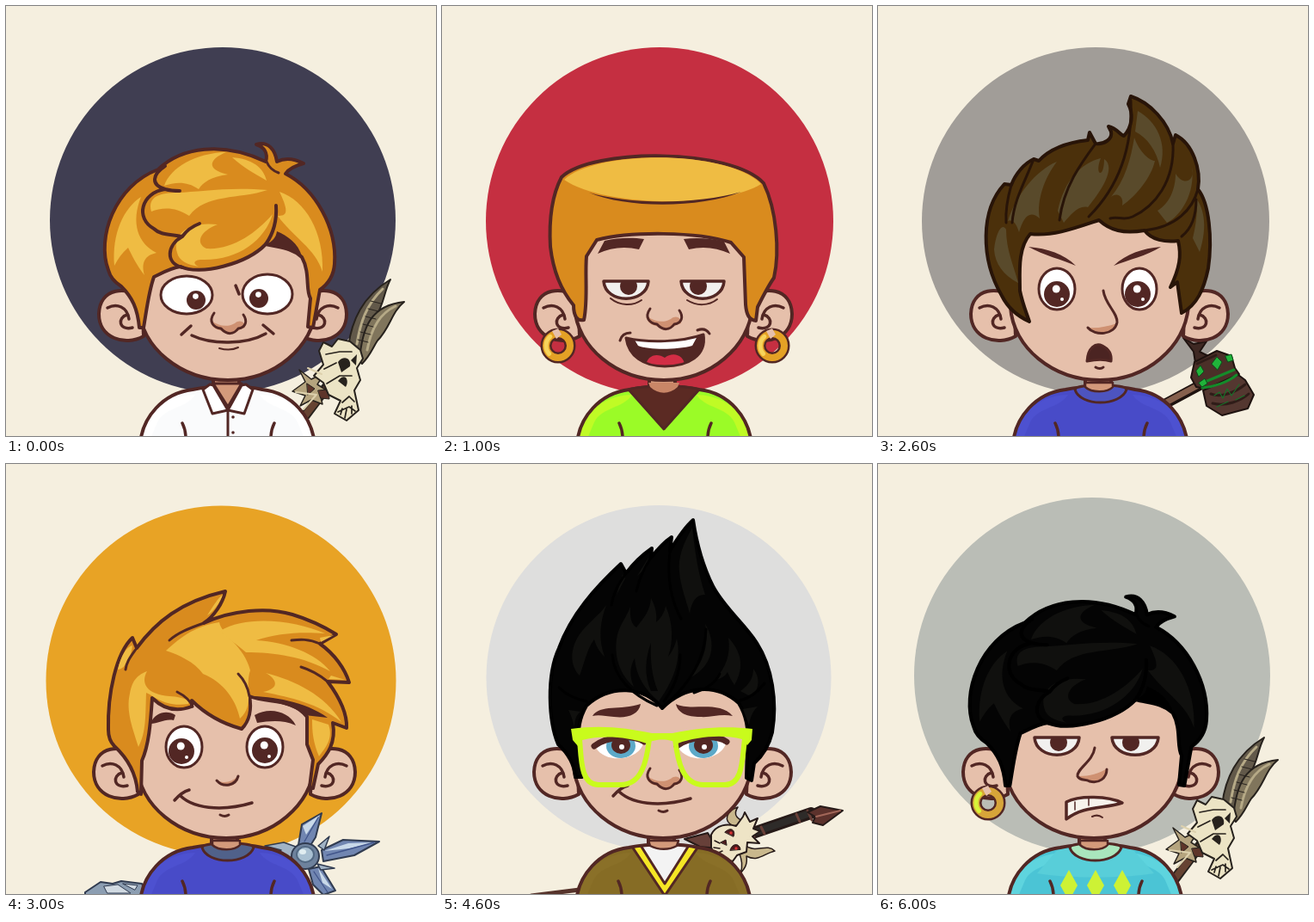
An HTML page with a canvas that plays this animation: 500 by 500 pixels, repeating every 7 s.

```html
<!DOCTYPE html>
<html lang="en">
<head>
<meta charset="utf-8">
<title>Avatars</title>
<style>
html, body { margin: 0; width: 100%; height: 100%; overflow: hidden; background: #f5efdf; }
canvas { display: block; width: 100vw; height: 100vh; }
</style>
</head>
<body>
<canvas id="stage" width="500" height="500"></canvas>
<script>
const ctx = document.getElementById('stage').getContext('2d');
const LINE = '#522724', SKIN = '#e6c0ab', SHADE = '#cf9172', WHITE = '#fff';
const GOLD = { base: '#d98b1e', light: '#efbc43', line: LINE };
const BLACK = { base: '#040404', light: '#10100e', line: '#000' };

function shape(d, fill, stroke, width = 4) {
  const p = new Path2D(d);
  if (fill) { ctx.fillStyle = fill; ctx.fill(p); }
  if (stroke) { ctx.strokeStyle = stroke; ctx.lineWidth = width; ctx.stroke(p); }
}
const line = (d, width = 3, color = LINE) => shape(d, null, color, width);

function oval(x, y, rx, ry, fill, stroke, width = 3) {
  ctx.beginPath();
  ctx.ellipse(x, y, rx, ry, 0, 0, Math.PI * 2);
  if (fill) { ctx.fillStyle = fill; ctx.fill(); }
  if (stroke) { ctx.strokeStyle = stroke; ctx.lineWidth = width; ctx.stroke(); }
}

function at(dx, dy, draw, sx = 1, sy = 1) {
  ctx.save();
  ctx.translate(dx, dy);
  ctx.scale(sx, sy);
  draw();
  ctx.restore();
}

function clipped(d, draw) {
  ctx.save();
  ctx.clip(new Path2D(d));
  draw();
  ctx.restore();
}

// Head, ears, body

function ear() {
  shape('M158 340C142 325 109 327 108 358C108 386 138 396 160 384Z', SKIN, LINE);
  line('M118 351C129 345 141 350 143 364M141 359C129 362 131 378 147 374', 3.5);
}

function head(dx, left, right) {
  at(left, 0, ear);
  at(515 + right, 0, ear, -1);
  at(dx, 0, () => {
    shape('M241 422V447C250 454 264 454 271 447V422Z', '#d49a7b', LINE);
    shape('M154 245V350C157 397 203 435 258 435C313 435 356 397 361 350V245Z', SKIN);
    line('M154 350C157 397 203 435 258 435C313 435 356 397 361 350', 4);
  });
}

const TORSO = 'M156 510C158 478 183 450 217 446C240 441 278 441 298 446C333 450 356 478 359 510Z';
const ARMS = 'M209 502C209 493 207 489 205 485M308 502C308 493 310 489 312 485';

function torso(dx, fill, light, details) {
  at(dx, 0, () => {
    shape(TORSO, fill);
    clipped(TORSO, () => {
      shape('M156 500C164 464 200 452 220 452C210 468 185 466 176 484L165 510ZM359 500C351 464 315 452 295 452C305 468 330 466 339 484L350 510Z', light);
      details();
    });
    shape(TORSO, null, LINE);
    line(ARMS, 3.5);
  });
}

function crewNeck(collar) {
  shape('M228 446C234 466 281 466 288 446C286 439 230 439 228 446Z', collar, LINE, 3);
  shape('M240 443C247 450 266 450 272 443V438H240Z', '#d49a7b', LINE, 2.5);
}

const sweater = (dx, collar) => {
  torso(dx, '#484bc8', '#4d51d0', () => {});
  at(dx, 0, () => crewNeck(collar));
};

function shirt() {
  torso(0, '#fafbfc', '#fff', () => line('M258 472V502', 3));
  [478, 496].forEach(y => oval(264, y, 1.8, 1.8, LINE));
  shape('M241 441L258 470L240 474L229 446L237 440ZM274 441L258 470L277 474L287 446L279 440Z', WHITE, LINE, 3);
  shape('M241 439L258 466L274 439Z', '#d49a7b', LINE, 3);
}

function limeShirt() {
  torso(1, '#9bfb27', '#c0fb25', () => {});
  shape('M217 446L258 492L299 446C284 441 232 441 217 446Z', '#5b2a23', LINE, 3);
  shape('M240 438L242 443C252 452 264 452 274 443L276 438Z', '#c98667');
}

function vest() {
  torso(0, '#866c25', '#8a7028', () => {
    shape('M219 442L259 502L300 442Z', '#f5e625', LINE, 3);
    shape('M230 442L259 488L288 442Z', '#f3f3f3', LINE, 3);
  });
  shape('M240 438L242 444C252 449 264 449 273 444L275 438Z', '#d49a7b', LINE, 2.5);
}

function argyle() {
  torso(-5, '#4bc4d5', '#5ed4de', () => {
    shape('M190 476C225 482 290 482 326 476L300 447H215Z', '#58ced9');
    [227, 258, 289].forEach(x => shape(`M${x} 472L${x + 10} 490L${x} 508L${x - 10} 490Z`, '#cdf235'));
  });
  at(-5, 0, () => crewNeck('#a9e6bd'));
}

// Hair

function sweptHair(c) {
  shape('M119 307C105 270 126 209 177 190C204 164 252 157 302 181C305 171 300 164 291 161C305 157 313 167 315 181C325 176 336 178 346 183C335 186 329 189 325 195C360 213 385 258 382 300C381 314 375 323 365 330L357 374L351 373L354 340C348 330 354 310 344 292C332 281 318 281 302 277C280 300 225 314 203 303C193 304 184 309 172 315C166 332 164 350 160 374L155 374C153 352 147 339 134 326C126 321 121 315 119 307Z', c.base, c.line);
  shape('M302 277C310 274 314 269 315 262C327 267 340 276 344 291C330 282 316 281 302 277Z', c.line);
  shape('M184 209C191 188 220 171 256 170C236 178 232 190 258 196C239 198 229 205 224 213C210 203 196 205 184 209Z', c.light);
  shape('M263 176C286 178 299 187 303 203C288 194 276 188 263 176ZM169 239C164 221 180 217 200 217C224 216 260 210 304 214C271 225 232 218 213 244C197 233 181 234 169 239Z', c.light);
  shape('M199 287C193 266 211 250 246 254C225 262 220 276 233 282C263 284 291 264 310 242C301 273 268 297 226 295C216 296 219 301 224 303C211 301 201 296 199 287Z', c.light);
  shape('M126 302C123 264 137 235 157 222C145 252 153 276 175 287C161 290 157 299 161 313C151 300 146 289 142 281C135 287 130 294 126 302ZM318 216C348 226 370 263 368 309C360 282 333 268 316 244C326 244 330 241 318 216Z', c.light);
  line('M185 186C170 196 168 208 185 213C157 217 150 247 172 259C180 267 192 265 205 268C187 278 185 299 205 304M185 213C192 215 197 215 202 215M205 268C210 261 217 256 225 253M314 232C315 248 312 263 302 277', 4, c.line);
  line('M303 181C306 188 311 192 317 194', 3, c.line);
}

function flatTop() {
  shape('M139 199C174 165 337 165 374 206C389 237 393 285 386 316C379 326 373 338 367 350L365 366C357 365 354 359 353 347L351 292L336 275C296 262 219 262 180 272L168 291C166 313 170 342 165 365C157 367 153 360 153 348C138 330 129 306 126 280C124 245 129 218 139 199Z', GOLD.base, LINE);
  shape('M142 202C178 168 330 166 371 207C326 235 188 234 142 202Z', GOLD.light);
  shape('M171 217C218 231 296 231 348 216C301 235 216 236 171 217Z', LINE);
  shape('M181 288L189 273C205 269 222 269 235 271L229 283C212 279 196 281 181 288ZM335 288L328 274C312 270 296 269 281 271L287 283C304 279 319 281 335 288Z', LINE);
}

function quiff() {
  const base = '#4b300b', light = '#594a2b', edge = '#281408';
  shape('M144 337C119 294 119 237 147 207L155 208C160 195 170 183 181 178L187 180C198 168 217 159 244 156L246 147L253 160C263 161 273 155 271 146L268 140C278 142 281 150 286 151C296 140 297 125 291 114L294 105C316 112 338 135 343 160L346 150C366 160 376 190 372 213C385 229 389 270 384 305C379 329 371 348 353 357L348 321L340 327C351 304 353 290 349 273C334 275 318 272 310 261C285 265 270 261 257 249C230 258 204 268 177 265C162 282 165 311 165 331C168 346 172 355 176 367C161 360 151 351 144 337Z', base, edge);
  const locks = 'M151 250C161 219 184 191 208 181C194 199 184 226 188 247C176 236 169 246 164 263C161 253 157 248 151 250ZM209 238C217 202 236 183 259 177C251 197 263 202 263 178C278 188 258 217 244 234C233 231 224 243 216 252ZM271 222C287 203 294 178 298 153C304 170 316 180 322 180C318 199 300 221 284 232C286 222 279 216 271 222ZM302 122C324 134 337 160 328 188C324 168 313 153 299 146ZM325 238C340 229 346 211 346 195C355 210 369 204 365 188C369 218 352 244 336 252ZM366 270C371 250 371 236 371 225C382 242 381 264 374 286ZM135 283C137 264 144 251 149 260C149 284 158 302 163 322C146 313 136 300 135 283Z';
  shape(locks, light);
  line('M181 178C172 202 158 225 156 252M253 160C236 183 216 210 211 249M294 110C296 160 282 208 245 245M343 160C345 204 322 233 296 245C286 250 278 244 270 247M372 213C366 236 347 257 310 261M155 208C151 222 148 237 149 252M353 268C367 257 370 239 370 225', 3, edge);
}

function windswept() {
  shape('M119 309C118 267 128 220 147 202L152 214C174 184 203 160 255 148C252 162 242 177 230 185C262 170 303 166 333 175C353 181 371 190 384 198L365 209C382 221 394 238 399 254L374 253C386 269 397 288 396 307L380 301C384 324 374 338 363 349L357 377L353 376L357 344L350 326V294C332 271 305 279 283 270C286 285 283 299 274 308C252 302 231 290 216 275L216 282C195 290 180 282 170 272C168 303 166 327 158 345L157 384L153 381C151 358 139 340 126 328C121 323 119 317 119 309Z', GOLD.base, LINE);
  shape('M347 292C337 282 315 277 283 270C309 270 348 276 374 295Z', LINE);
  shape('M186 217C211 194 226 188 248 184C251 200 277 211 284 240C277 260 290 280 272 296C268 276 254 254 229 244C219 230 201 222 186 217Z', GOLD.light);
  shape('M249 194C280 175 337 182 371 197C339 195 316 197 291 205C326 207 360 220 377 241C346 224 313 219 279 219C268 209 257 203 249 194ZM144 267C147 250 154 245 164 241C156 255 164 268 190 270C209 271 214 276 212 279C184 283 173 270 163 266C162 294 163 312 154 329C148 309 139 288 144 267Z', GOLD.light);
  shape('M241 165C246 158 248 155 252 152C249 161 242 171 234 176ZM365 202L381 199L366 207ZM378 246L394 251L375 250ZM302 243C337 252 371 269 390 300C362 278 333 272 299 265C319 261 315 250 302 243ZM356 297L375 303C381 320 371 330 364 340C357 323 356 312 356 297ZM130 239C134 222 140 213 147 211C145 228 137 239 130 239Z', GOLD.light);
  line('M152 214C145 224 140 230 139 239M230 185C213 191 200 196 190 205M365 209C352 203 341 204 332 205M374 253C363 244 353 239 343 236M283 270C281 258 276 250 270 244M217 282C214 275 207 269 199 265', 3);
}

function spikes(c) {
  shape('M155 364C154 350 146 336 135 326C124 300 121 246 136 214C150 175 178 144 208 116L214 127C223 115 234 105 244 98L243 109C250 100 258 91 267 85L265 101C274 86 283 73 292 65C296 92 303 118 315 142C328 167 352 186 366 208C384 236 390 276 384 312C380 329 371 341 363 348L360 368L354 365L355 327C357 308 353 291 345 278C318 254 282 258 256 284C234 258 196 256 168 281C160 295 157 310 160 326L163 364Z', c.base, c.line);
  shape('M160 246C148 234 149 214 160 198C170 184 183 176 191 164C183 186 182 204 189 224C182 217 179 211 177 204C169 214 166 230 160 246ZM252 276C236 262 226 248 224 226C218 236 218 247 223 259C208 246 200 226 203 204C205 188 214 180 219 166C218 180 221 187 226 190C234 180 242 171 243 156C249 167 250 176 249 184C255 179 259 172 260 165C269 186 269 206 263 224C268 218 271 211 273 203C279 228 268 254 252 276Z', c.light);
  shape('M291 74C281 92 274 108 276 126C278 145 284 158 288 174C290 160 296 151 306 152C298 128 294 101 291 74ZM286 250C303 233 311 212 306 186C319 207 317 235 286 250ZM317 251C330 237 336 222 333 202C347 217 353 235 340 257C336 251 334 247 332 242C329 247 324 250 317 251ZM347 264C357 257 362 249 362 238C371 250 368 262 360 271Z', c.light);
  shape('M147 286L161 288C156 292 154 298 154 306C152 298 150 292 147 286ZM350 285L367 282C361 288 358 295 357 304ZM210 128L213 133L203 152ZM240 109L238 120L227 130Z', c.light);
  shape('M243 264C235 246 236 227 243 208C242 229 244 247 251 264Z', c.base);
  line('M214 127C205 140 199 150 197 164M243 109C234 122 229 135 226 148M265 101C261 135 267 160 278 180M136 260C144 268 154 273 168 276M375 255C366 267 356 273 344 276M198 222C200 248 220 268 250 281M307 192C306 228 288 256 259 281M277 222C277 242 270 260 258 276M323 244C318 255 306 262 293 266', 3, c.line);
}

// Facial features

function dotEye(x, y, rx, ry, px, py, r, iris) {
  oval(x, y, rx, ry, WHITE, LINE, 3);
  oval(px, py, r, r, iris || '#522724');
  if (iris) oval(px, py, r * 0.62, r * 0.62, '#3a2122');
  oval(px - r * 0.05, py - r * 0.4, r * 0.3, r * 0.3, WHITE);
}

function lidEye(x, y, w, px) {
  const d = `M${x - w} ${y}C${x - w + 2} ${y + 27} ${x + w - 2} ${y + 27} ${x + w} ${y}Z`;
  shape(d, '#f1f0ee');
  clipped(d, () => oval(px, y + 6, 10, 10, LINE));
  shape(d, null, LINE, 3.5);
}

function blueEye(x) {
  const d = `M${x - 28} 330C${x - 15} 316 ${x + 17} 316 ${x + 27} 325C${x + 21} 345 ${x - 17} 349 ${x - 28} 330Z`;
  shape(d, WHITE);
  clipped(d, () => {
    oval(x + 1, 328, 17, 14, '#5ca9c8');
    oval(x + 1, 327, 11, 10, LINE);
    oval(x + 2, 329, 3, 3, WHITE);
  });
  line(`M${x - 30} 328C${x - 15} 316 ${x + 17} 315 ${x + 28} 323`, 7);
}

function roundNose(dy = 0) {
  at(0, dy, () => {
    shape('M239 366C238 378 252 376 256 380C264 385 269 376 278 374C278 367 272 364 266 369C257 374 247 372 239 366Z', SHADE);
    line('M242 357C235 367 241 374 250 375C257 383 265 382 270 375C279 374 281 366 276 359');
  });
}

function smirk(dx, dy) {
  at(dx, dy, () => {
    line('M196 391C202 384 206 381 213 379M203 386C222 404 260 402 286 394', 3.5);
    line('M249 408C253 410 256 410 259 408');
  });
}

function smile(dx, dy) {
  at(dx, dy, () => {
    line('M204 382L215 372M216 383C239 394 279 394 302 381M299 371L311 381', 3.5);
    line('M248 398C255 400 264 400 270 397', 2);
  });
}

function cheerful() {
  dotEye(210, 336, 30, 22, 221, 342, 11);
  dotEye(304, 335, 29, 23, 294, 340, 11);
  line('M267 325L271 335', 3.5);
  roundNose();
  smile(0, 0);
}

function laughing() {
  lidEye(214, 320, 26, 217);
  lidEye(303, 320, 25, 298);
  line('M196 340C207 349 222 349 232 342M285 342C296 349 310 349 320 341', 2);
  roundNose(-5);
  const mouth = 'M214 386C240 392 278 391 304 382C308 407 286 419 259 419C234 419 217 407 214 386Z';
  shape(mouth, LINE);
  clipped(mouth, () => {
    shape('M222 385C244 392 276 391 297 384L291 395C272 400 241 400 228 395Z', WHITE);
    shape('M237 422C236 407 249 402 259 409C269 401 284 406 282 422Z', '#d22d45');
  });
  shape(mouth, null, LINE, 3);
  line('M207 389C209 382 213 380 219 380M311 381C307 375 302 375 297 377');
}

function shocked() {
  shape('M175 280C197 282 216 288 230 302C214 295 193 290 175 280ZM329 280C307 282 289 288 274 302C291 295 312 291 329 280Z', LINE);
  dotEye(208, 329, 21, 24, 208, 335, 15);
  dotEye(304, 329, 20, 24, 302, 335, 15);
  [[214, 341], [308, 341]].forEach(([x, y]) => oval(x, y, 2, 2, WHITE));
  shape('M244 374C255 375 266 373 278 369C276 383 254 385 244 374Z', SHADE);
  line('M262 331C264 347 279 357 278 368C275 383 252 384 244 374');
  shape('M243 413C244 397 253 391 261 395C269 399 272 405 271 413C262 410 252 411 243 413Z', '#4b2422', LINE, 3);
  line('M253 420C256 422 260 422 262 420');
}

function sly() {
  shape('M168 302C173 288 188 286 197 292L195 298C184 296 178 302 168 302ZM289 292C307 282 329 288 337 304C321 297 307 299 292 301Z', LINE);
  dotEye(207, 329, 21, 24, 204, 334, 15);
  dotEye(301, 329, 21, 24, 301, 333, 15);
  [[210, 341], [306, 340]].forEach(([x, y]) => oval(x, y, 2, 2, WHITE));
  shape('M246 368C254 372 262 370 270 363C271 375 252 379 246 368Z', SHADE);
  line('M245 368C253 377 267 374 270 363');
  smirk(0, 0);
}

function glasses() {
  const lime = '#c9fb1c';
  line('M160 320C162 343 161 373 182 373H208C232 373 238 346 241 320M271 320C274 346 280 373 304 373H329C350 373 349 343 352 320', 6, lime);
  shape('M150 308C185 303 215 307 244 313H268C297 307 329 304 361 308L360 321L355 327L349 320C326 314 296 317 274 325C266 319 247 319 238 325C215 317 186 315 163 321L158 328L152 321Z', lime);
}

function bookish() {
  shape('M175 293C184 279 207 287 231 279C229 292 214 296 200 294C190 293 182 291 175 293ZM272 279C288 288 322 274 338 293C324 290 314 295 300 294C286 294 274 290 272 279Z', LINE);
  blueEye(207);
  blueEye(303);
  roundNose(-3);
  smirk(3, -5);
}

function upbeat() {
  shape('M172 301C182 284 214 285 229 296C227 303 222 305 216 303C200 299 186 300 172 304ZM281 297C290 284 315 286 327 300L325 304C312 300 298 300 288 304C284 304 281 302 281 297Z', LINE);
  dotEye(206, 337, 30, 28, 209, 338, 14, '#4c90a5');
  dotEye(299, 337, 29, 28, 291, 338, 14, '#4c90a5');
  shape('M237 365C247 369 256 364 265 357C265 371 243 377 237 365Z', SHADE);
  line('M255 337L249 346M237 365C244 374 264 370 265 357');
  smile(-4, 1);
}

function annoyed() {
  lidEye(208, 318, 26, 210);
  lidEye(299, 318, 27, 294);
  shape('M233 363C247 363 256 360 267 354C264 372 241 373 233 363Z', SHADE);
  line('M252 330C250 346 231 354 232 363C235 369 241 366 246 369C257 372 266 365 266 355');
  shape('M219 393C234 385 268 386 284 394C263 401 239 397 219 413Z', '#f7f3ec', LINE, 3.5);
  line('M229 393V402M245 389V397', 1.5);
  line('M249 410C253 408 257 408 261 411', 2);
}

function earring(x, y, base, light) {
  oval(x, y, 14, 14, null, LINE, 13);
  oval(x, y, 14, 14, null, base, 8);
  ctx.beginPath();
  ctx.arc(x, y, 14, 2.4, 4);
  ctx.strokeStyle = light;
  ctx.lineWidth = 5;
  ctx.stroke();
  shape(`M${x - 7} ${y - 17}L${x} ${y - 20}L${x + 4} ${y - 13}L${x - 2} ${y - 8}Z`, SKIN);
}

// Weapons

function dragonStaff() {
  const edge = '#27221d', bone = '#ece4c5';
  line('M336 492L372 444', 12, edge);
  line('M337 490L372 445', 8, '#664332');
  shape('M398 396C402 366 414 338 447 318C439 333 440 346 430 361C424 379 425 396 414 414Z', '#62594a', edge, 2);
  shape('M411 413C414 372 425 348 463 344C448 356 447 374 432 389C426 398 424 406 414 416Z', '#80755c', edge, 2);
  line('M408 393C412 368 419 347 438 329M420 400C424 378 433 358 453 349', 3, '#b6aa87');
  for (let i = 0; i < 6; i++) line(`M${409 + i * 3} ${388 - i * 9}l12 3`, 1, edge);
  shape('M348 437L341 423L355 434L371 426L362 440L376 449L365 451L368 463L355 458L342 465L348 453L333 448Z', '#b5a47e', edge, 1.5);
  shape('M350 439L359 445L351 452ZM363 447L375 446L376 457L366 456Z', '#5e352a', edge, 1);
  shape('M364 401L369 391L379 396L386 387L400 390L412 400L415 410L408 421L412 435L405 447L410 470L396 482L382 474L389 459L375 452L369 438L358 430L369 417Z', bone, edge, 2);
  shape('M386 414C393 405 402 410 400 419L390 426ZM386 436C394 425 400 435 395 443ZM401 412L408 405L407 418Z', edge);
  line('M372 405L388 402L402 402M370 422L384 415M373 439L388 430L402 430M391 461L399 454L405 460M386 472L399 466L406 471M394 479L396 469M389 475L391 468M402 474V465', 1.7, edge);
  line('M367 428L351 421M337 449L361 452M346 469L360 453', 2, '#ddd1ad');
}

function hammer() {
  const edge = '#1e120f', wood = '#4b2f28', green = '#148b2a';
  line('M322 469L376 440', 12, edge);
  line('M322 468L376 439', 7, '#86604d');
  shape('M355 386L367 393L382 390L374 402L386 408L369 415L367 402Z', '#3e2823', edge, 2);
  shape('M364 432L368 414L394 401L411 407L415 421L420 428L382 445L370 443Z', wood, edge, 2);
  shape('M378 447L419 429L427 435L437 452L430 468L400 476L382 465Z', '#543730', edge, 2);
  line('M377 444C391 443 407 437 417 429M378 438L414 423', 3, green);
  shape('M388 416L394 408L400 414L395 423ZM370 424L375 418L379 425L373 431ZM404 407L411 405L413 412L407 414ZM373 438L380 433L383 439L377 443Z', '#20b43a', '#0b4f1b', 1);
  line('M387 451C399 456 416 449 427 440M389 462C405 466 422 459 431 451M371 416L393 406', 3, '#2f1c18');
  line('M391 453L397 449L401 456L406 445L411 453L420 440M394 466L407 460M416 458L426 453', 1.2, '#176f28');
}

function iceStaff() {
  const edge = '#303b50', ice = '#7186b1', pale = '#c9d9e9';
  shape('M92 498L110 486L124 488L134 485L158 488L163 502H92Z', '#8c9eb2', edge, 2);
  shape('M114 491L130 489L145 499H118ZM136 488L153 490L150 495Z', '#d1dae2', edge, 1);
  shape('M340 443L344 419L367 406L360 434L353 445Z', ice, edge, 2);
  shape('M367 449L392 437L434 439L405 455L369 462Z', ice, edge, 2);
  shape('M352 471L366 468L383 496L369 501L357 489Z', ice, edge, 2);
  shape('M345 421L365 408L349 431ZM370 450L398 441L429 440L399 447ZM363 470L379 494L368 487Z', pale);
  line('M347 439L363 411M373 455L428 440M358 474L374 498', 1.3, '#41558b');
  shape('M337 445L323 440L301 444L320 449L304 455L335 461ZM363 444L376 433L370 449ZM362 465L382 470L366 472ZM338 466L330 477L344 471Z', '#a1b3c5', edge, 1.5);
  oval(348, 456, 16, 15, '#6e829d', edge, 2);
  oval(348, 454, 10, 9, '#a9c0d2', '#526983', 2);
  oval(345, 451, 4, 3, '#e1edf1');
}

function skullStaff() {
  const edge = '#261a18', bone = '#eee4c6';
  line('M104 502L160 495', 5, '#56332b');
  shape('M282 436L309 429L320 447L300 445Z', '#674039', edge, 2);
  line('M350 433L429 406', 14, edge);
  line('M350 433L428 406', 8, '#2e2b29');
  line('M359 426L363 434M371 422L375 430M412 407L416 416M425 403L430 414', 3, '#693f37');
  shape('M425 405L440 398L466 403L443 420L431 417L434 410Z', '#5c322c', edge, 2);
  line('M435 410L463 403', 2, '#a26759');
  shape('M339 421C326 415 331 403 344 399C337 409 345 413 353 417ZM352 443C365 454 377 440 387 450C374 453 368 463 354 456C356 468 349 473 347 476C351 465 347 457 345 450Z', '#c9b88d', edge, 1.5);
  shape('M313 431C319 419 332 418 342 421L350 410L352 405L358 416L367 412L362 424L370 427L361 433L369 441L355 440L354 451L343 455L338 462L318 457L313 446Z', bone, edge, 2);
  shape('M329 428C336 421 342 426 339 433ZM335 449C338 440 346 441 347 448ZM324 440L330 437L331 443Z', '#4e1b1c', edge, 1);
  line('M317 438L323 441M316 446L323 447M319 453L326 450', 1.5, edge);
  oval(336, 429, 1.7, 1.7, '#dc3333');
  oval(342, 447, 1.7, 1.7, '#dc3333');
}

// Each avatar: disc [x, y, r, color], head offsets [face, left ear, right ear], then its parts
const avatars = [
  { disc: [252, 249, 201, '#403e52'], offsets: [0, 0, -11], weapon: dragonStaff, body: shirt,
    hair: () => sweptHair(GOLD), face: cheerful },
  { disc: [253, 250, 202, '#c52f41'], offsets: [0, 0, 0], body: limeShirt, hair: flatTop, face: laughing,
    extra() { earring(135, 395, '#e4a125', '#f7d45b'); earring(384, 395, '#e4a125', '#f7d45b'); } },
  { disc: [253, 250, 202, '#a19d98'], offsets: [0, 0, 0], weapon: hammer,
    body: () => sweater(1, '#4d54c0'), hair: quiff, face: shocked },
  { disc: [250, 252, 203.5, '#e8a325'], offsets: [-2, -6, -1], weapon: iceStaff,
    body: () => sweater(0, '#50618a'), hair: windswept, face: sly },
  { disc: [252, 248.5, 200.5, '#dededd'], offsets: [-1, -1, -1], weapon: skullStaff, body: vest,
    hair: () => spikes(BLACK), face: bookish, extra: glasses },
  { disc: [248, 251.5, 203.5, '#46426b'], offsets: [-5, -7, -7], weapon: () => at(-5, 1, hammer),
    body: () => sweater(-4, '#4c8799'),
    hair: () => at(-3, 2, () => spikes(GOLD)), face: upbeat },
  { disc: [249, 246, 207, '#babdb6'], offsets: [-7, -9, -11], weapon: () => at(2, 0, dragonStaff), body: argyle,
    hair: () => at(384 * -0.03, 375 * -0.03, () => sweptHair(BLACK), 1.03, 1.03), face: annoyed,
    extra() { earring(128, 394, '#d7a539', '#d9f238'); } }
];

function drawAvatar(a) {
  ctx.fillStyle = '#f5efdf';
  ctx.fillRect(0, 0, 500, 500);
  const [x, y, r, color] = a.disc;
  oval(x, y, r, r, color);
  if (a.weapon) a.weapon();
  head(...a.offsets);
  a.body();
  a.face();
  a.hair();
  if (a.extra) a.extra();
}

ctx.lineJoin = ctx.lineCap = 'round';
function tick() {
  drawAvatar(avatars[Math.floor(performance.now() / 1000) % avatars.length]);
  requestAnimationFrame(tick);
}
tick();
</script>
</body>
</html>
```
